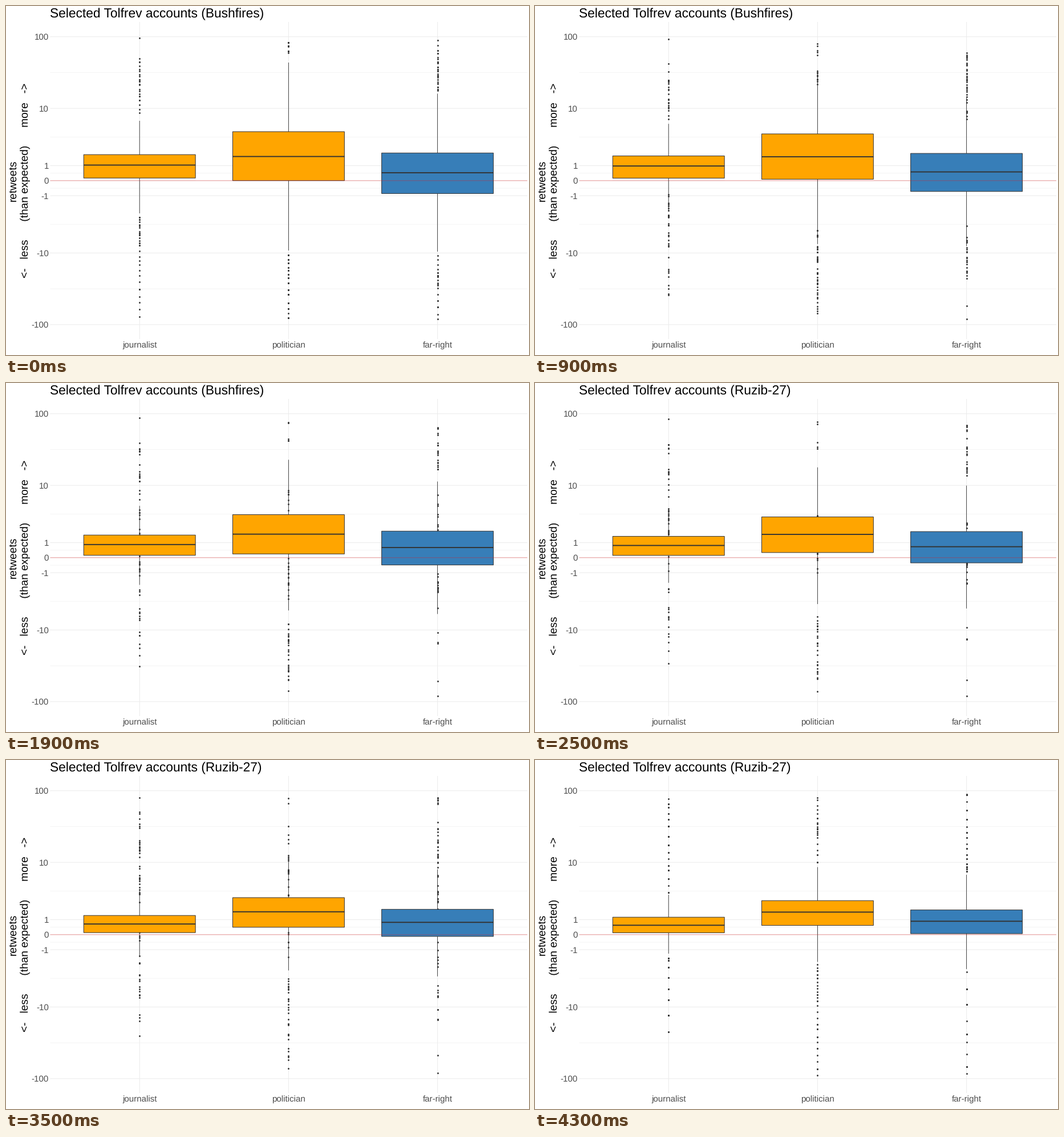
Recreate the animation shown at these times as a matplotlib script. Size 917 by 611 pixels, loop 8000 ms.

```python
import matplotlib.pyplot as plt
import numpy as np
from matplotlib.animation import FuncAnimation
from matplotlib.patches import Rectangle

W, H, DPI = 917, 611, 64
PX = 72 / DPI  # points per pixel
INTERVAL, FRAMES = 100, 80
HOLD, STEP, STEPS = 500, 200, 20

ORANGE, BLUE, RED = "#FFA500", "#377EB8", "#E41A1C"
INK, TICK, GRID, MINOR = "#333333", "#4D4D4D", "#EBEBEB", "#F3F3F3"
TITLE = "Selected Tolfrev accounts ({})"
TOPICS = "Bushfires", "Ruzib-27"

LEFT, RIGHT, TOP, BOTTOM = 77.5, 914, 28, 583
PITCH = 261.2
FIRST_X = 234.2
BOX_HALF = 0.375 * PITCH
ZERO_Y, SCALE = 305.8, 54.73
DOTS = 56

plt.rcParams["font.family"] = "Liberation Sans"
plt.rcParams["text.hinting"] = "none"

# Each state: upper whisker, box top, median, box bottom, lower whisker, and
# its outliers above and below as (count, quartile heights).
GROUPS = [
    dict(name="journalist", color=ORANGE, lone=[(56, 68)],
         stats=([201, 260.2, 278.5, 301.2, 363],
                [236, 275.2, 289.3, 302.4, 339]),
         start=[(19, [92, 118, 136, 155, 187]),
                (25, [370, 394, 421, 471, 544])],
         end=[(14, [77, 105, 156, 192, 232]),
              (8, [347, 358, 390, 426, 476])]),
    dict(name="politician", color=ORANGE, lone=[(71, 66), (538, 541)],
         stats=([99, 220, 263.5, 305.7, 428],
                [187.5, 246.2, 266.3, 289.6, 353.5]),
         start=[(4, [63.5, 71, 80, 82]),
                (13, [436, 458, 475, 506, 546])],
         end=[(18, [70, 105, 120, 133, 179]),
              (24, [358, 393, 425, 486, 552])]),
    dict(name="far-right", color=BLUE, lone=[(90, 60), (548, 548.5)],
         stats=([153.5, 257.3, 291.9, 328.3, 430],
                [201, 262.4, 282.3, 304, 366]),
         start=[(20, [60, 97, 117, 130, 148]),
                (16, [437, 465, 481, 494, 540])],
         end=[(16, [61, 114, 151, 184, 195]),
              (8, [371, 420, 472, 498, 537])]),
]

rng = np.random.default_rng(11)
fig = plt.figure(figsize=(W / DPI, H / DPI), dpi=DPI, facecolor="white")
ax = fig.add_axes([0, 0, 1, 1])
ax.set_xlim(0, W)
ax.set_ylim(H, 0)
ax.axis("off")


def line(x0, y0, x1, y1, color, width, z, **kw):
    return ax.plot([x0, x1], [y0, y1], color=color, lw=width * PX, zorder=z,
                   solid_capstyle="butt", snap=False, **kw)[0]


def label(x, y, text, size, color="black", **kw):
    return ax.text(x, y, text, fontsize=size * PX, color=color,
                   va="baseline", rotation_mode="anchor", **kw)


def value_y(value):
    """Height of a value on the pseudo-logarithmic axis."""
    return ZERO_Y - SCALE * np.arcsinh(value / 2)


def spread(count, knots):
    """Heights that follow the quartiles, slightly jittered between the ends."""
    place = np.linspace(0, len(knots) - 1, count)
    y = np.interp(place, range(len(knots)), knots)
    y[1:-1] += rng.normal(0, 1.3, count - 2)
    return y


def pool(clusters):
    """All outliers of a state, some doubled up to reach the full count."""
    y = np.concatenate([spread(*cluster) for cluster in clusters])
    return np.append(y, rng.choice(y, DOTS - len(y)))


def mix(start, end, p):
    return start + (end - start) * p


class Box:
    """One category: outliers, whiskers, box and median."""

    def __init__(self, x, name, color, lone, stats, start, end):
        self.x = x
        self.stats = np.array(stats)
        lone_start, lone_end = np.transpose(lone)
        self.start = np.append(pool(start), lone_start)
        self.end = np.append(rng.permutation(pool(end)), lone_end)

        self.dots = ax.scatter([], [], s=(2.9 * PX) ** 2, color=INK, lw=0,
                               zorder=3)
        self.whiskers = [line(x, 0, x, 0, INK, 0.9, 4) for _ in range(2)]
        self.body = Rectangle((x - BOX_HALF, 0), 2 * BOX_HALF, 1, fc=color,
                              ec=INK, lw=PX, zorder=5, snap=False)
        ax.add_patch(self.body)
        self.median = line(x - BOX_HALF, 0, x + BOX_HALF, 0, INK, 1.9, 6)
        line(x, TOP, x, BOTTOM, GRID, 1, 1)
        label(x, 597.5, name, 15.1, TICK, ha="center")

    def update(self, p):
        y = mix(self.start, self.end, p)
        self.dots.set_offsets(np.column_stack([np.full(len(y), self.x), y]))
        high, top, mid, bottom, low = mix(*self.stats, p)
        self.whiskers[0].set_ydata([high, top])
        self.whiskers[1].set_ydata([bottom, low])
        self.body.set_y(top)
        self.body.set_height(bottom - top)
        self.median.set_ydata([mid, mid])


ticks = [100, 10, 1, 0, -1, -10, -100]
heights = [value_y(v) for v in ticks]
for tick, y in zip(ticks, heights):
    line(LEFT, y, RIGHT, y, GRID, 1, 1)
    label(75, y + 5.4, str(tick), 15.1, TICK, ha="right")
for above, below in zip(heights, heights[1:]):
    y = (above + below) / 2
    line(LEFT, y, RIGHT, y, MINOR, 0.8, 1)
line(LEFT, ZERO_Y, RIGHT, ZERO_Y, RED, 0.9, 7, alpha=0.45)

boxes = [Box(FIRST_X + i * PITCH, **group) for i, group in enumerate(GROUPS)]

title = label(77, 20, "", 22.7)
label(18, 305.5, "retweets", 19.1, ha="center", rotation=90)
label(39, 305.5, "<-   less      (than expected)      more   ->", 19.1,
      ha="center", rotation=90)


def update(frame):
    t = frame * INTERVAL
    step = min(max((t - HOLD) // STEP + 1, 0), STEPS)
    title.set_text(TITLE.format(TOPICS[step > STEPS // 2]))
    for box in boxes:
        box.update(step / STEPS)
    return []


anim = FuncAnimation(fig, update, frames=FRAMES, interval=INTERVAL,
                     repeat=True, repeat_delay=0, init_func=lambda: update(0))
plt.show()
```
